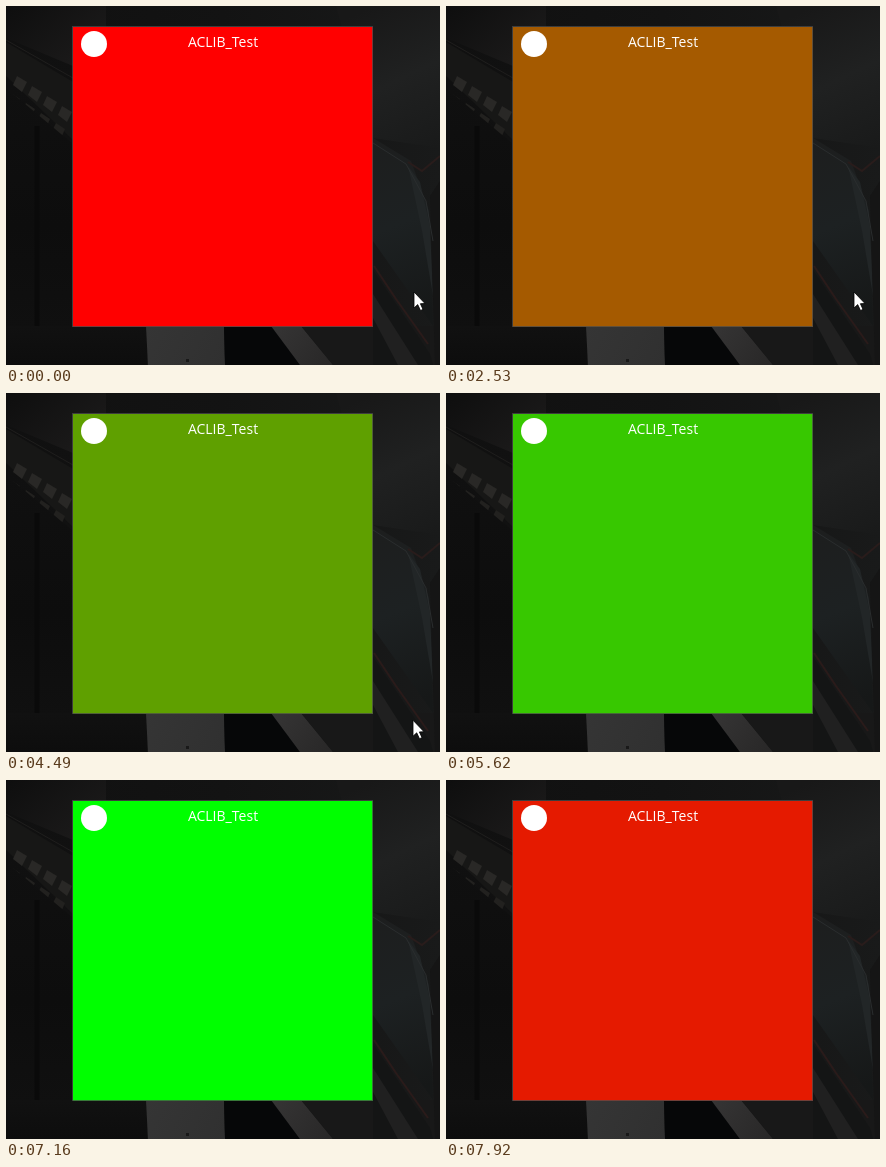
Recreate the animation shown at these times as an HTML page with a canvas. Size 434 px wide and 359 px high, loop 8 s.

```html
<!DOCTYPE html>
<html lang="en">
<head>
<meta charset="utf-8">
<title>ACLIB_Test</title>
<style>
  html, body { margin: 0; width: 100%; height: 100%; overflow: hidden; background: #111; }
  canvas { display: block; }
</style>
</head>
<body>
<canvas id="stage" width="434" height="359"></canvas>
<script>
const W = 434, H = 359;
const LOOP = 8000;
const RAMP = 7160;      // red to green
const RESET = 7200;     // hard jump back to red
const ctx = document.getElementById('stage').getContext('2d');

function poly(g, fill, ...pts) {
  g.fillStyle = fill;
  g.beginPath();
  for (let i = 0; i < pts.length; i += 2) g.lineTo(pts[i], pts[i + 1]);
  g.closePath();
  g.fill();
}

function line(g, color, width, ...pts) {
  g.strokeStyle = color;
  g.lineWidth = width;
  g.beginPath();
  for (let i = 0; i < pts.length; i += 2) g.lineTo(pts[i], pts[i + 1]);
  g.stroke();
}

function gradient(g, x0, y0, x1, y1, ...colors) {
  const fill = g.createLinearGradient(x0, y0, x1, y1);
  colors.forEach((c, i) => fill.addColorStop(i / (colors.length - 1), c));
  return fill;
}

// Dim scenery behind the panel
function makeScene() {
  const scene = document.createElement('canvas');
  scene.width = W;
  scene.height = H;
  const g = scene.getContext('2d');

  g.fillStyle = gradient(g, 0, 0, W, 0, '#101010', '#131313', '#191a1a');
  g.fillRect(0, 0, W, H);

  // left wall
  poly(g, gradient(g, 0, 0, 60, 70, '#0e0e0e', '#1b1a1a'), 0, 0, 100, 0, 100, 40, 67, 60, 0, 32);
  poly(g, '#171716', 0, 36, 67, 76, 67, 134, 0, 70);
  line(g, '#1f1e1d', 1, 0, 34, 67, 72);
  for (let i = 0; i < 4; i++) {
    const x = 2 + i * 15, y = 62 + i * 10;
    poly(g, '#292826', x + 9, y + 8, x + 19, y + 14, x + 14, y + 24, x + 5, y + 17);
    poly(g, '#22211f', x + 3, y + 25, x + 12, y + 31, x + 9, y + 38, x, y + 31);
  }
  poly(g, gradient(g, 0, 80, 0, H, '#101010', '#0d0d0d', '#111111'), 0, 82, 67, 138, 67, H, 0, H);
  line(g, '#0a0a0a', 5, 31, 120, 31, 320);

  // floor
  g.fillStyle = gradient(g, 0, 320, 0, H, '#111111', '#0d0d0d');
  g.fillRect(0, 320, 141, 39);
  poly(g, gradient(g, 140, 320, 218, H, '#353535', '#303030'), 140, 320, 218, 320, 219, H, 142, H);
  g.fillStyle = '#191919';
  g.fillRect(180, 353, 3, 3);
  poly(g, '#060708', 218, 320, 267, 320, 294, H, 219, H);
  poly(g, gradient(g, 270, 320, 320, H, '#353434', '#292828'), 265, 320, 295, 320, 327, H, 294, H);
  poly(g, '#181818', 295, 320, W, 320, W, H, 327, H);

  // right side
  poly(g, gradient(g, 367, 0, 434, 140, '#181818', '#202121', '#191a1a'), 330, 0, W, 0, W, 142, 367, 132);
  poly(g, gradient(g, 367, 130, 434, 300, '#1d1e1e', '#1d2122', '#161818'), 367, 132, 405, 155, 423, 205, 427, 320, 367, 235);
  poly(g, '#222627', 402, 160, 414, 176, 424, 220, 427, 290, 416, 225);
  poly(g, '#151515', 424, 190, W, 175, W, H, 429, H);
  poly(g, '#141515', 367, 264, 424, 348, 427, H, 367, H);
  poly(g, '#202020', 367, 288, 412, H, 392, H, 367, 312);
  line(g, '#2a2d2e', 1, 367, 137, 400, 158, 420, 195, 427, 235);
  line(g, '#2a1b1a', 2, 368, 260, 390, 293, 422, 338);
  line(g, '#291c1b', 2, 402, 156, 416, 165, W, 150);
  return scene;
}

const scene = makeScene();

function drawPanel(t) {
  const p = t < RESET ? Math.min(1, t / RAMP) : (t - RESET) / RAMP;
  ctx.fillStyle = `rgb(${Math.round(255 * (1 - p))}, ${Math.round(255 * p)}, 0)`;
  ctx.fillRect(67, 21, 300, 300);
  ctx.strokeStyle = 'rgba(75, 75, 75, 0.75)';
  ctx.lineWidth = 1;
  ctx.strokeRect(66.5, 20.5, 300, 300);

  ctx.fillStyle = '#fff';
  ctx.beginPath();
  ctx.arc(88, 38, 13, 0, Math.PI * 2);
  ctx.fill();

  ctx.font = '14px "Open Sans", "Noto Sans", sans-serif';
  ctx.textAlign = 'center';
  ctx.textBaseline = 'alphabetic';
  ctx.fillText('ACLIB_Test', 217, 41);
}

// The pointer rests, then slides down out of view
function drawCursor(t) {
  const s = Math.max(0, t - 4270) / 220;
  const y = 286 + 41 * Math.pow(s, 1.25);
  if (y > H) return;
  ctx.save();
  ctx.translate(408 - Math.min(1, s), y);
  ctx.beginPath();
  const shape = [0, 0, 0, 16, 3.7, 12.6, 6.5, 18.5, 9, 17.4, 6.4, 11.7, 11, 11.5];
  for (let i = 0; i < shape.length; i += 2) ctx.lineTo(shape[i], shape[i + 1]);
  ctx.closePath();
  ctx.fillStyle = '#fff';
  ctx.fill();
  ctx.strokeStyle = '#000';
  ctx.lineWidth = 0.8;
  ctx.stroke();
  ctx.restore();
}

function frame() {
  const t = performance.now() % LOOP;
  ctx.drawImage(scene, 0, 0);
  drawPanel(t);
  drawCursor(t);
  requestAnimationFrame(frame);
}

frame();
</script>
</body>
</html>
```
